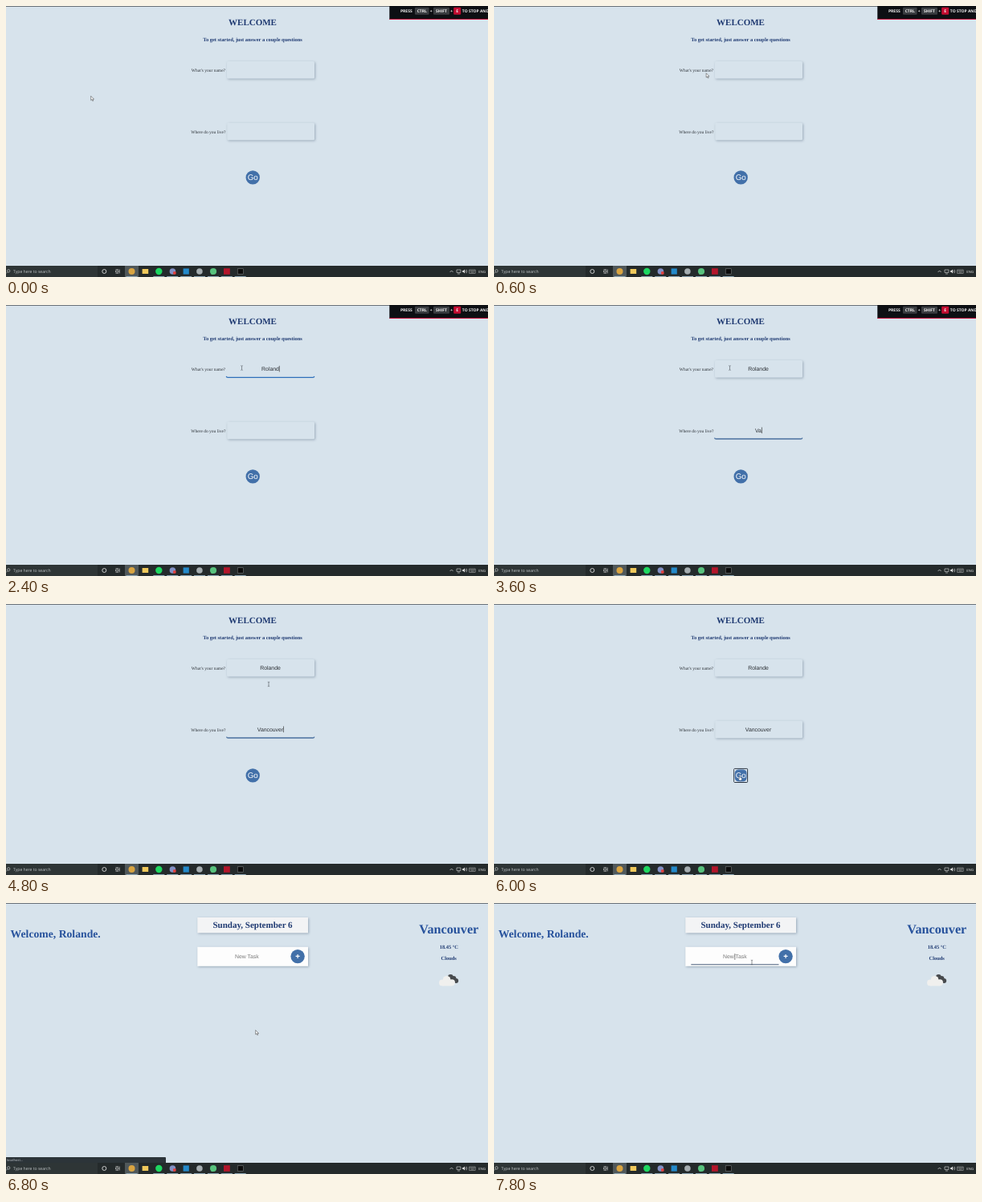
An HTML page that plays this animation: 600x338 px, repeating every 8000 ms.

```html
<!DOCTYPE html>
<html lang="en">
<head>
<meta charset="utf-8">
<title>Welcome form</title>
<style>
  html, body { margin: 0; width: 100%; height: 100%; overflow: hidden; background: #d7e3ec; }
  svg { display: block; width: 100%; height: 100%; }
  text { text-rendering: geometricPrecision; white-space: pre; }
  .serif { font-family: "Liberation Serif", "Times New Roman", serif; }
  .sans { font-family: "Liberation Sans", Arial, sans-serif; }
  .ui { font-family: "Open Sans", "Noto Sans", sans-serif; }
  .bold { font-weight: 700; }
  .mid { text-anchor: middle; }
  .end { text-anchor: end; }
  .raised { filter: drop-shadow(1.3px 1.3px 1.5px rgba(70, 90, 115, .42)); }
</style>
</head>
<body>
<svg id="stage" viewBox="0 0 600 338" preserveAspectRatio="none" xmlns="http://www.w3.org/2000/svg"></svg>
<script>
const LOOP = 8000, STEP = 200;
const NAME = 'Rolande', CITY = 'Vancouver';
const BG = '#d7e3ec', NAVY = '#1f3a72', BLUE = '#27529c', BUTTON = '#4270a9';

const stage = document.getElementById('stage');

function add(parent, tag, attrs = {}, content = '') {
  const el = document.createElementNS('http://www.w3.org/2000/svg', tag);
  for (const key in attrs) el.setAttribute(key, attrs[key]);
  el.textContent = content;
  return parent.appendChild(el);
}
const group = () => add(stage, 'g');
const rect = (g, x, y, width, height, fill, more) => add(g, 'rect', { x, y, width, height, fill, ...more });
const circle = (g, cx, cy, r, fill) => add(g, 'circle', { cx, cy, r, fill });
const line = (g, d, stroke, width = 1) => add(g, 'path', { d, stroke, 'stroke-width': width, fill: 'none' });
const text = (g, str, x, y, size, fill, cls) => add(g, 'text', { x, y, 'font-size': size, fill, class: cls }, str);
const show = (el, on) => el.setAttribute('visibility', on ? 'inherit' : 'hidden');

rect(stage, 0, 0, 600, 338, BG);

// Question form
const form = group();
text(form, 'WELCOME', 307, 24, 11, NAVY, 'serif bold mid');
text(form, 'To get started, just answer a couple questions', 307, 43.6, 6.42, NAVY, 'serif bold mid');
text(form, "What's your name?", 230.8, 82.3, 5.5, '#2b3036', 'serif');
text(form, 'Where do you live?', 230.2, 158.9, 5.5, '#2b3036', 'serif');

function field(left, top, accent) {
  const box = rect(form, left, top, 384 - left, 21.5, BG, { rx: 1.5, class: 'raised' });
  const bottom = top + 21.3;
  const underline = line(form, `M${left - .8} ${bottom - 1.4}q.4 1.4 1.9 1.4H382q1.5 0 1.9-1.4`, accent, 1.3);
  const value = text(form, '', 329, top + 12.9, 6.88, '#2b2f34', 'sans mid');
  const caret = rect(form, 0, top + 6.8, .6, 7.6, '#222');
  return (str, focused, caretOn) => {
    show(box, !focused);
    show(underline, focused);
    if (value.textContent !== str) value.textContent = str;
    const half = str ? value.getComputedTextLength() / 2 : 0;
    caret.setAttribute('x', 329 + half);
    show(caret, focused && caretOn);
  };
}
const nameField = field(275, 69, '#2f6fba');
const cityField = field(275.3, 145.7, '#49709f');

circle(form, 307.2, 213.9, 8.7, BUTTON);
text(form, 'Go', 307.3, 216.6, 9.8, '#fff', 'sans mid');
const ring = add(form, 'g');
rect(ring, 298.8, 205.4, 16.8, 17, 'none', { stroke: '#15202e', 'stroke-width': 1, rx: .8 });
rect(ring, 299.6, 206.2, 15.2, 15.4, 'none', { stroke: '#eef4fa', 'stroke-width': .6 });

// Task page
const tasks = group();
text(tasks, `Welcome, ${NAME}.`, 5.6, 43.3, 13.7, BLUE, 'serif bold');
rect(tasks, 238.3, 18, 137.7, 19.3, '#f3f4f5', { class: 'raised' });
text(tasks, 'Sunday, September 6', 307, 31.4, 11, NAVY, 'serif bold mid');
rect(tasks, 238.3, 54.8, 137.7, 24, '#fdfdfd', { class: 'raised' });
text(tasks, 'New Task', 299.8, 69.3, 6.88, '#7a7a7a', 'sans mid');
const taskLine = line(tasks, 'M245.3 76.8H354.5', '#4b5f7d', 1.1);
const taskCaret = rect(tasks, 299.6, 63.2, .6, 7.6, '#222');
circle(tasks, 363.1, 66.6, 8.7, BUTTON);
line(tasks, 'M360.6 66.4h5M363.1 63.9v5', '#fff', 1.1);

text(tasks, CITY, 551.3, 37.5, 16.2, BLUE, 'serif bold mid');
text(tasks, '18.45 °C', 551.3, 57, 6.42, NAVY, 'serif bold mid');
text(tasks, 'Clouds', 551.2, 70.8, 6.42, NAVY, 'serif bold mid');
function cloud(fill, ...puffs) {
  puffs.forEach(([x, y, r]) => circle(tasks, x, y, r, fill));
}
cloud('#474a4d', [553.4, 92.4, 3.4], [557.2, 94.3, 3.2], [560.2, 97, 3]);
cloud('#f0f0ee', [543, 99.4, 3.9], [548.6, 95.7, 4.8], [555, 99.2, 4]);
rect(tasks, 543, 97, 12, 6.4, '#f0f0ee');

const status = add(tasks, 'g');
rect(status, -2, 317, 201, 8, '#2c3439', { rx: 1 });
text(status, 'Waiting for localhost...', 21, 322.3, 4, '#c6cbd0', 'ui end');

// Taskbar
const bar = group();
rect(bar, 0, 324, 600, 14, '#242a2b');
rect(bar, 0, 324, 114, 14, '#2e3536');
rect(bar, 148, 324, 17, 14, '#50585a');
add(bar, 'circle', { cx: 3.2, cy: 330.4, r: 1.7, fill: 'none', stroke: '#d8dcdc', 'stroke-width': .6 });
line(bar, 'M2 331.6L.2 333.5', '#d8dcdc', .6);
text(bar, 'Type here to search', 9, 333, 5.1, '#c2c7c8', 'ui');
add(bar, 'circle', { cx: 122.3, cy: 331, r: 2.5, fill: 'none', stroke: '#eee', 'stroke-width': .8 });
line(bar, 'M136.5 328.7h3.6M136.5 333.3h3.6M136.5 330h3.6v2h-3.6zM141.3 328.5v5', '#ddd', .6);
circle(bar, 156.5, 331, 4, '#d9a441');
rect(bar, 169.6, 328, 7.6, 6, '#f0c95c');
circle(bar, 190.3, 331, 4.2, '#1ed760');
circle(bar, 207.4, 331, 3.8, '#8290c4');
circle(bar, 209.8, 333, 2, '#e0413f');
rect(bar, 220.6, 327.4, 7.2, 7.2, '#2489ca');
circle(bar, 240.9, 331, 3.8, '#a5adb0');
circle(bar, 258, 331, 4.1, '#58c27d');
rect(bar, 271, 327.2, 7.8, 7.6, '#b3162b');
rect(bar, 288.2, 327.8, 7.4, 6.4, '#0b0b0b', { stroke: '#8b8f90', 'stroke-width': .5 });
for (let i = 0; i < 9; i++) {
  if (i !== 1) rect(bar, 149.5 + 16.9 * i, 337, 14, 1, '#8da6b5');
}
line(bar, 'M552.6 332l2-2 2 2', '#ddd', .7);
line(bar, 'M561 329h5v3.4h-5zM562 334h3', '#ddd', .6);
add(bar, 'path', { d: 'M568.2 330h1.2l1.7-1.5v5l-1.7-1.5h-1.2z', fill: '#ddd' });
line(bar, 'M572 329.5q1 1.5 0 3M573.2 328.7q1.6 2.3 0 4.6', '#ddd', .5);
line(bar, 'M576.6 329h7.6v4.4h-7.6zM577.5 330.6h6M578.5 332.2h4', '#ccc', .5);
text(bar, 'ENG', 588.3, 332.9, 4.3, '#eee', 'ui');

rect(stage, 0, 0, 600, .8, '#4f565c');

// Recorder hint
const hint = group();
rect(hint, 477.3, 0, 123, 16.7, '#0d0f13');
rect(hint, 477.3, 16, 123, 1, '#c3123a');
function label(str, x, width, key) {
  if (key) rect(hint, x, 1.8, width, 9, key, { rx: 1 });
  text(hint, str, x + width / 2, 8.1, 5, '#f4f4f4', 'ui bold mid');
}
label('PRESS', 489.8, 17);
label('CTRL', 509, 17.6, '#3a3d41');
label('+', 527.5, 3.5);
label('SHIFT', 532, 20, '#3a3d41');
label('+', 553, 3.2);
label('E', 557.2, 9, '#c40d31');
label('TO STOP AND', 568.8, 31.4);

// Pointers, each drawn around its hot spot
const pointer = group();
const shapes = {
  arrow: add(pointer, 'path', { d: 'M0 0v5.3l1.2-1.1 .9 2 .9-.4-.9-1.9h1.7z', fill: '#fff', stroke: '#333', 'stroke-width': .5 }),
  beam: line(pointer, 'M-1.2-2.8Q0-2.8 0-2.2V2.2Q0 2.8-1.2 2.8M1.2-2.8Q0-2.8 0-2.2M0 2.2Q0 2.8 1.2 2.8', '#4c5359', .6),
  hand: add(pointer, 'path', { d: 'M-.6 0q.6-.7 1.1 0v1.9l2 .5v1.7l-.6 1.5h-2.4L-2 3l.6-.4 .8.6z', fill: '#fff', stroke: '#26384f', 'stroke-width': .4 })
};

// [time, x, y, shape]; positions ease between rows
const track = [
  [0, 105.7, 112.3, 'arrow'],
  [800, 293.5, 78.5, 'beam'],
  [4400, 293.5, 78.5, 'beam'],
  [4800, 327, 100, 'beam'],
  [5000, 322, 140, 'arrow'],
  [5400, 306, 214.5, 'hand'],
  [6000, 306, 214.5, 'hand'],
  [6200, 306.5, 213, 'arrow'],
  [6800, 310.7, 158.6, 'arrow'],
  [7400, 321, 74, 'beam'],
  [LOOP, 321, 74, 'beam']
];

function movePointer(t) {
  const i = track.findIndex((row, n) => t < track[n + 1][0]);
  const [t0, x0, y0, shape] = track[i], [t1, x1, y1] = track[i + 1];
  const p = (t - t0) / (t1 - t0), e = p * p * (3 - 2 * p);
  pointer.setAttribute('transform', `translate(${x0 + (x1 - x0) * e} ${y0 + (y1 - y0) * e})`);
  for (const key in shapes) show(shapes[key], key === shape);
}

const KEY_TIME = 150;
const within = (t, from, to) => t >= from && t < to;
const typed = (str, t, start) => str.slice(0, Math.max(0, Math.floor((t - start) / KEY_TIME) + 1));

// The caret restarts its blink with every key
function caretOn(t, focus, start, str) {
  const lastKey = start + KEY_TIME * (str.length - 1);
  const since = t < start ? t - focus : Math.max(0, t - lastKey);
  return since % 1000 < 500;
}

function draw(t) {
  const onForm = t < 6200;
  show(form, onForm);
  show(tasks, !onForm);
  if (onForm) {
    nameField(typed(NAME, t, 1600), within(t, 1000, 3000), caretOn(t, 1000, 1600, NAME));
    cityField(typed(CITY, t, 3400), within(t, 3000, 5600), caretOn(t, 3000, 3400, CITY));
    show(ring, t >= 5600);
  } else {
    show(taskLine, t >= 7400);
    show(taskCaret, t >= 7400);
    show(status, t < 7200);
  }
  // Children inherit from hidden pages through display
  form.style.display = onForm ? '' : 'none';
  tasks.style.display = onForm ? 'none' : '';
  show(hint, t < 3800);
  movePointer(t);
}

function tick() {
  const t = performance.now() % LOOP;
  draw(Math.floor(t / STEP) * STEP);
  requestAnimationFrame(tick);
}
tick();
</script>
</body>
</html>
```
